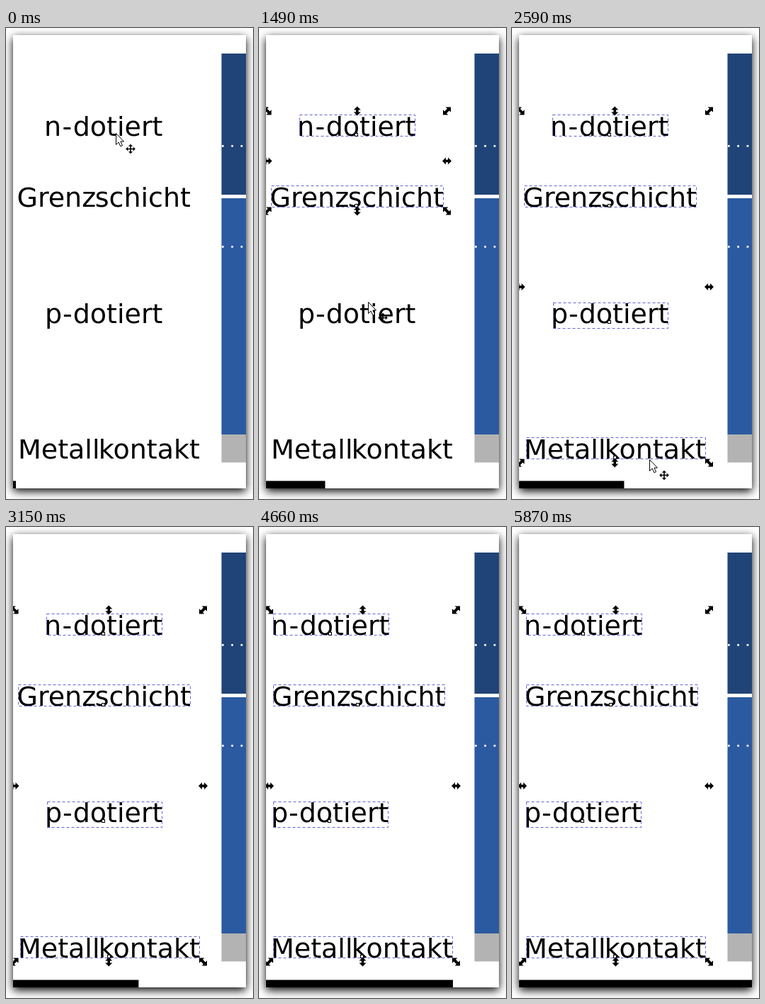
Animation of 349x664 px, one loop 5.95 s. Source, as an HTML page with a canvas:

```html
<!DOCTYPE html>
<html lang="de">
<head>
<meta charset="utf-8">
<title>Beschriftungen ausrichten</title>
<style>
html, body { margin: 0; width: 100%; height: 100%; overflow: hidden; background: #fff; }
canvas { display: block; }
</style>
</head>
<body>
<canvas id="stage" width="349" height="664"></canvas>
<script>
const ctx = document.getElementById('stage').getContext('2d');
const LOOP = 5950, POSES = 46, STEP = LOOP / POSES;
const PAGE = { x: 10, y: 10, w: 329, h: 639 };

// Every label is clicked in turn; it counts as selected when its click ends
const FIRST_CLICK = 40, CLICK_EVERY = 725, CLICK_TIME = 270;
const ALIGN_AT = 4650, ALIGN_LEFT = 20;
const EXIT = { x: 330, y: 700 };

const LABELS = [
  { head: 'n', joint: '-', tail: 'dotiert', left: 57, right: 220.5, base: 151.5, tap: { x: 155, y: 148 } },
  { head: 'Grenz', tail: 'schicht', left: 17.5, right: 260, base: 251.5, tap: { x: 145, y: 248 } },
  { head: 'p', joint: '-', tail: 'dotiert', left: 58, right: 220.5, base: 416, descent: 7, tap: { x: 155, y: 410 } },
  { head: 'Metall', tail: 'kontakt', left: 20, right: 273, base: 606.5, tap: { x: 155, y: 582 } }
];

const clickStart = i => FIRST_CLICK + i * CLICK_EVERY;
const clickEnd = i => clickStart(i) + CLICK_TIME;
const mix = (a, b, u) => a + (b - a) * u;

function rect(color, x, y, w, h) {
  ctx.fillStyle = color;
  ctx.fillRect(x, y, w, h);
}

function polygon(points) {
  ctx.beginPath();
  points.forEach(([x, y]) => ctx.lineTo(x, y));
  ctx.closePath();
}

function drawPage() {
  rect('#fff', 0, 0, 349, 664);
  ctx.save();
  ctx.shadowColor = '#000';
  ctx.shadowBlur = 12;
  ctx.shadowOffsetY = 4;
  rect('#fff', PAGE.x, PAGE.y, PAGE.w, PAGE.h);
  ctx.restore();
}

function drawCell() {
  const x = 304.5, w = 34.5;
  rect('#214478', x, 36, w, 199);
  rect('#2c5aa0', x, 240, w, 333);
  rect('#b3b3b3', x, 573, w, 39.5);
  for (const y of [165, 307])
    for (let i = 0; i < 3; i++) rect('#fff', 305 + i * 13.3, y, 2.7, 2.7);
}

// Head and tail touch the sides of the label; a joint sits midway between them
function drawLabel({ head, joint, tail, left, right, base }) {
  ctx.font = '38px "DejaVu Sans", sans-serif';
  ctx.fillStyle = '#000';
  const headX = left + ctx.measureText(head).actualBoundingBoxLeft;
  const tailX = right - ctx.measureText(tail).actualBoundingBoxRight;
  ctx.fillText(head, headX, base);
  ctx.fillText(tail, tailX, base);
  if (!joint) return;
  const gap = tailX - headX - ctx.measureText(head).width;
  ctx.fillText(joint, tailX - (gap + ctx.measureText(joint).width) / 2, base);
}

function doubleArrow(x, y, angle, len, head, shaft) {
  ctx.save();
  ctx.translate(x, y);
  ctx.rotate(angle);
  const n = len - head;
  polygon([[-len, 0], [-n, -head], [-n, -shaft], [n, -shaft], [n, -head],
    [len, 0], [n, head], [n, shaft], [-n, shaft], [-n, head]]);
  ctx.fill();
  ctx.restore();
}

function drawFrame({ left, right, base, descent = 0 }) {
  const x = Math.floor(left), y = Math.floor(base) - 29;
  ctx.strokeStyle = '#6464dc';
  ctx.lineWidth = 1;
  ctx.setLineDash([4, 3]);
  ctx.strokeRect(x + 0.5, y + 0.5, Math.floor(right) - x, Math.round(base) + descent - y);
  ctx.setLineDash([]);
  const mx = Math.round((left + right) / 2) - 4, my = Math.round(base) - 4;
  rect('#000', mx, my, 5, 5);
  rect('#fff', mx + 1, my + 1, 3, 3);
}

function drawHandles(labels) {
  const margin = 5.5;
  const left = Math.min(...labels.map(l => l.left)) - margin;
  const right = Math.max(...labels.map(l => l.right)) + margin;
  const top = labels[0].base - 29 - margin;
  const last = labels[labels.length - 1];
  const bottom = last.base + (last.descent || 0) + margin + 1;
  const cx = (left + right) / 2, cy = (top + bottom) / 2;
  const diagonal = Math.PI / 4;
  ctx.fillStyle = '#000';
  for (const [x, sx] of [[left, 1], [right, -1]]) {
    for (const [y, sy] of [[top, 1], [bottom, -1]])
      doubleArrow(x, y, diagonal * sx * sy, 7.8, 5.2, 2);
    doubleArrow(x, cy, 0, 6.5, 5, 1.8);
  }
  for (const y of [top, bottom]) doubleArrow(cx, y, Math.PI / 2, 6.5, 5, 1.8);
}

function drawClick({ x, y }) {
  ctx.save();
  ctx.globalCompositeOperation = 'multiply';
  ctx.fillStyle = '#fbf23c';
  ctx.beginPath();
  ctx.arc(x + 1.5, y, 16, 0, Math.PI * 2);
  ctx.fill();
  ctx.restore();
}

function pointerAt(t) {
  const i = Math.max(0, LABELS.findLastIndex((_, k) => t >= clickStart(k)));
  const from = LABELS[i].tap;
  const to = i + 1 < LABELS.length ? LABELS[i + 1].tap : EXIT;
  const travel = (t - clickEnd(i)) / (CLICK_EVERY - CLICK_TIME);
  const u = Math.min(1, Math.max(0, travel));
  return { x: mix(from.x, to.x, u), y: mix(from.y, to.y, u) };
}

function drawPointer({ x, y }) {
  ctx.save();
  ctx.translate(Math.round(x) + 0.5, Math.round(y) + 0.5);
  polygon([[0, 0], [0, 16], [3.6, 12.5], [6.3, 18.3], [9, 17.2], [6.4, 11.5], [11, 11.5]]);
  ctx.fillStyle = '#fff';
  ctx.fill();
  ctx.strokeStyle = '#000';
  ctx.lineWidth = 1;
  ctx.stroke();
  ctx.translate(20.5, 22);
  ctx.fillStyle = '#000';
  for (const angle of [0, Math.PI / 2]) doubleArrow(0, 0, angle, 6.8, 3.1, 0.8);
  ctx.restore();
}

function aligned(label) {
  return { ...label, left: ALIGN_LEFT, right: label.right + ALIGN_LEFT - label.left };
}

function draw(now) {
  const pose = Math.min(POSES - 1, Math.floor((now % LOOP) / STEP + 0.2));
  const t = pose * STEP;
  const labels = t >= ALIGN_AT ? LABELS.map(aligned) : LABELS;
  const selected = labels.filter((_, i) => t >= clickEnd(i));
  const pointer = pointerAt(t);

  drawPage();
  ctx.save();
  ctx.beginPath();
  ctx.rect(PAGE.x, PAGE.y, PAGE.w, PAGE.h);
  ctx.clip();
  drawCell();
  labels.forEach(drawLabel);
  if (LABELS.some((_, i) => t >= clickStart(i) && t < clickEnd(i))) drawClick(pointer);
  selected.forEach(drawFrame);
  if (selected.length) drawHandles(selected);
  drawPointer(pointer);
  rect('#000', PAGE.x, 638.5, mix(4, PAGE.w, pose / (POSES - 1)), 10.5);
  ctx.restore();
}

const began = performance.now();
function tick() {
  draw(performance.now() - began);
  requestAnimationFrame(tick);
}
tick();
</script>
</body>
</html>
```
